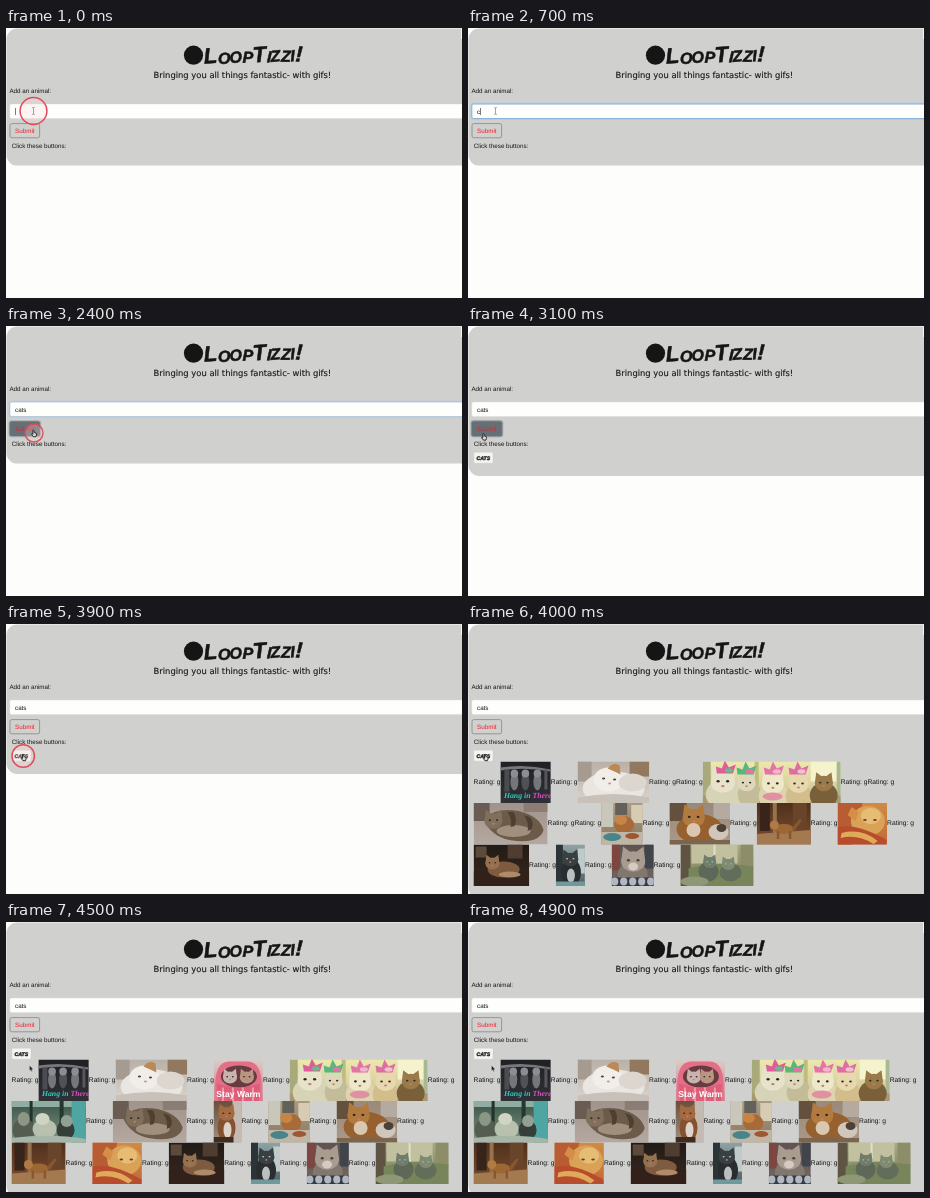
An HTML page for the animation above (5100 ms loop, 456 by 270 pixels).

```html
<!DOCTYPE html>
<html lang="en">
<head>
<meta charset="utf-8">
<title>Animal search</title>
<style>
  html, body { margin: 0; width: 100%; height: 100%; overflow: hidden; background: #fdfdfb; }
  #stage { display: block; width: 456px; height: 270px; }
  text { font-family: "Liberation Sans", Arial, sans-serif; font-size: 6.25px; fill: #151515; white-space: pre; text-rendering: geometricPrecision; }
  .marker { font-weight: bold; font-style: italic; stroke: #151515; stroke-width: .5px; }
  .tag { font-family: "DejaVu Sans", Verdana, sans-serif; font-size: 8.38px; stroke: #151515; stroke-width: .12px; }
  .rate { font-size: 6.7px; }
</style>
</head>
<body>
<svg id="stage" viewBox="0 0 456 270" xmlns="http://www.w3.org/2000/svg">
  <rect width="456" height="270" fill="#fdfdfb"/>
  <rect id="panel" x=".4" y=".6" width="480" height="137" rx="11" fill="#d0d0ce"/>
  <rect x="455" y="1" width="1" height="10" fill="#f6f6f4"/>

  <circle cx="187.5" cy="27.2" r="9.6" fill="#151515"/>
  <g id="title" transform="rotate(-1.5 247 28)"></g>
  <text class="tag" x="147.6" y="49.6">Bringing you all things fantastic- with gifs!</text>

  <text x="3.4" y="65.2">Add an animal:</text>
  <rect id="glow" x="2.6" y="74.8" width="470" height="16.6" rx="3" fill="#a9c9ea"/>
  <rect x="3.8" y="76" width="470" height="14.6" rx="1.8" fill="#fefefd" stroke="#dcdcda" stroke-width=".4"/>
  <rect id="edge" x="3.8" y="76" width="470" height="14.6" rx="1.8" fill="none" stroke="#7fabd9" stroke-width=".9"/>
  <text id="typed" x="9" y="86"></text>
  <rect id="caret" x="9" y="80" width=".7" height="7" fill="#444"/>

  <rect id="halo" x="2.6" y="94.2" width="32.6" height="17" rx="3" fill="#6c757d" opacity="0"/>
  <rect x="4" y="95.6" width="29.6" height="14.2" rx="1.8" fill="none" stroke="#83888a" stroke-width=".8"/>
  <rect id="dark" x="3.8" y="95.4" width="30" height="14.6" rx="1.8" fill="#667074" opacity="0"/>
  <text id="submit" x="18.8" y="105" text-anchor="middle" style="fill:#ea1f2c">Submit</text>

  <text x="5.8" y="120.2">Click these buttons:</text>
  <g id="tagButton">
    <rect x="5.8" y="126.2" width="19.2" height="11" rx="1" fill="#f4f4f1" stroke="#c6c6c2" stroke-width=".4"/>
    <text class="marker" x="15.4" y="133.6" text-anchor="middle" style="font-size:5.2px;stroke-width:.35px">CATS</text>
  </g>
  <g id="gallery"></g>

  <circle id="ring" fill="#ffdcdc" fill-opacity=".28" stroke="#df4c59" stroke-width="1.5"/>
  <g id="pointer">
    <path id="beam" d="M-1.3-3.5Q0-3.5 0-2.6Q0-3.5 1.3-3.5M0-2.6V2.6M-1.3 3.5Q0 3.5 0 2.6Q0 3.5 1.3 3.5" fill="none" stroke="#666" stroke-width=".6"/>
    <path id="hand" d="M-1.2-3.2Q-.5-3.7 0-3L.3-1 2.2-.4Q2.7 0 2.4 1.4L1.9 3.1H-.7L-2.3.8Q-2.4 0-1.7.1L-1 .7Z" fill="#ddd" stroke="#1c1c1c" stroke-width=".9"/>
    <path id="arrow" d="M-1.6-3.2V2.6L-.3 1.5.6 3.4 1.5 3 .7 1.1 2.5 1Z" fill="#222" stroke="#eee" stroke-width=".4"/>
  </g>
</svg>
<script>
const $ = id => document.getElementById(id);
const LOOP = 5100, STEP = 100;

// Tables hold [time, ...values]; the latest row that has begun is in force.
const at = (rows, t) => rows.filter(r => r[0] <= t).pop().slice(1);

const POINTER = [
  [0, 'beam', 27.5, 83], [1000, '', 0, 0],
  [1800, 'beam', 19.5, 87], [1900, 'beam', 18.5, 91],
  [2000, 'hand', 19, 97], [2100, 'hand', 22, 101], [2200, 'hand', 26, 105], [2300, 'hand', 28, 107.6],
  [2900, 'hand', 28, 108], [3100, 'hand', 16, 111],
  [3200, 'arrow', 15, 115], [3300, 'arrow', 15, 121],
  [3400, 'hand', 16, 127], [3500, 'hand', 17, 131], [3600, 'hand', 17.6, 133.6],
  [4500, 'arrow', 25, 146.4]
];
const RING = [
  [0, 27.5, 83, 13.4, 1], [100, 27.5, 83, 14, .6], [200, 27.5, 83, 14.4, .25], [300, 0, 0, 0, 0],
  [2400, 28, 107, 9, .9], [2500, 28, 107, 11.5, 1], [2600, 28, 107, 13, .5], [2700, 0, 0, 0, 0],
  [3700, 17.2, 132, 7, .8], [3800, 17.2, 132, 9.5, 1], [3900, 17.2, 132, 11.2, 1], [4000, 0, 0, 0, 0]
];
const FOCUS = [[0, 0], [100, .4], [200, .8], [300, 1], [2400, .5], [2500, 0]];
const HOVER = [[0, 0], [2000, .4], [2100, .8], [2200, 1], [3200, .5], [3300, 0]];
const HALO = [[0, 0], [2400, .4], [2500, .6], [3500, .3], [3600, 0]];
const TYPED = [[0, ''], [700, 'c'], [800, 'ca'], [1100, 'cat'], [1300, 'cats']];
const CARET = [[0, 1], [500, 0], [700, 1], [1800, 0]];
const PANEL = [[0, 137], [2500, 149.4], [4000, 273.9]];
const PHASE = [[0, -1], [4000, 0], [4100, 1], [4500, 2], [4900, 3]];

// Shape helpers
const box = (x, y, w, h, c) => `<rect x="${x}" y="${y}" width="${w}" height="${h}" fill="${c}"/>`;
const oval = (x, y, rx, ry, c) => `<ellipse cx="${x}" cy="${y}" rx="${rx}" ry="${ry}" fill="${c}"/>`;
const path = (d, c) => `<path d="${d}" fill="${c}"/>`;
const head = (x, y, r, c, eye = '#2b2723') =>
  path(`M${x - r} ${y}l${r * .15} ${-r * 1.25} ${r * .6} ${r * .45}h${r * .5}l${r * .6} ${-r * .45} ${r * .15} ${r * 1.25}z`, c) +
  oval(x, y, r, r * .85, c) +
  oval(x - r * .4, y - r * .1, r * .13, r * .1, eye) +
  oval(x + r * .4, y - r * .1, r * .13, r * .1, eye) +
  oval(x, y + r * .3, r * .14, r * .1, '#b98078');
const hat = (x, y, c, c2) =>
  path(`M${x - 9} ${y}l-1-7 6 2 3-8 4 7 7-3-3 9z`, c) + oval(x + 3, y - 3, 4, 2.2, c2);

// Each photo: width, top tone, bottom tone, shapes for a sway s.
const PHOTOS = [
  [50.4, '#1f2023', '#303136', s =>
    path('M0 6Q25 2 50 8V10Q25 5 0 9Z', '#77787d') + box(4, 8, 5, 22, '#4b4c51') + box(44, 8, 3, 20, '#56575c') +
    [14, 25, 37].map((x, i) => oval(x + s, 20, 4, 9, i % 2 ? '#505156' : '#75767b') + oval(x + s, 12, 3.8, 4, '#8c8d92')).join('') +
    '<text x="3.5" y="36.6" style="font:italic bold 7.8px \'Liberation Serif\',serif;fill:#35c9bb">Hang in <tspan fill="#d94fc0">There</tspan></text>'],
  [71.5, '#b9b0a6', '#d9d4ce', s =>
    box(52, 0, 20, 15, '#92785e') + box(0, 0, 14, 20, '#a69b90') +
    oval(36, 27, 31, 17, '#e9e5e0') + oval(30 + s, 18, 15, 12, '#f1eeea') + oval(55, 21, 14, 9, '#dcd6cf') +
    path(`M${29 + s} 7q6-7 12-3l1 9q-6-3-13-6z`, '#bb8858') + oval(25 + s, 17, 1.6, .9, '#4d443c') + oval(36 + s, 18, 1.6, .9, '#4d443c') +
    oval(31 + s, 22, 1.5, 1, '#c99690') + path('M0 36Q36 29 72 36V42H0Z', '#c8c1ba')],
  [49, '#d9cdc6', '#d8788c', s =>
    path('M2 38Q-2 3 15 2H34Q51 3 47 38Z', '#e26f87') + oval(25, 17, 18, 11, '#683b40') +
    head(17 + s, 18, 7, '#c8b4ac') + head(32 - s, 18, 7, '#b99582') +
    path('M3 24Q25 32 46 24L45 42H4Z', '#df5d78') +
    [8, 18, 28, 38].map(x => box(x, 28, 2, 14, '#eb9dac')).join('') +
    '<text x="24.5" y="37" text-anchor="middle" style="font-weight:bold;font-size:8.6px;fill:#fff">Stay Warm</text>'],
  [138, '#ece8ae', '#cbbf96', s =>
    box(0, 0, 8, 42, '#a9aa7c') + box(52, 0, 4, 26, '#bfbd7e') + box(108, 0, 26, 20, '#f5f3cd') +
    box(134, 0, 4, 42, '#a8b893') + box(0, 34, 138, 8, '#a99772') +
    oval(24, 33, 21, 16, '#d6d3b6') + head(20 + s, 21, 12, '#e6e3ca') + oval(47, 33, 12, 13, '#c3bc98') + head(44 - s, 22, 9, '#ddd8ba') +
    oval(71, 35, 15, 14, '#ddd3af') + head(70 + s, 23, 11, '#eee7c8') + oval(70, 35, 10, 4, '#df91a2') +
    oval(96, 35, 13, 13, '#d3bd8c') + head(96 - s, 23, 10, '#e8d8ae') +
    oval(121, 34, 14, 13, '#79603b') + head(121 + s, 22, 9, '#9b7a4a') +
    hat(23 + s, 12, '#df5d9a', '#5fbf88') + hat(44 - s, 13, '#57b77d', '#e573a8') +
    hat(71 + s, 13, '#e474a8', '#f0b6cc') + hat(96 - s, 13, '#df6ca2', '#efc0d0')],
  [74.3, '#3a5446', '#829589', s =>
    box(0, 0, 74, 6, '#8fada0') + box(60, 0, 14, 42, '#4fa5a2') + box(18, 0, 3, 30, '#21342c') + box(48, 0, 4, 34, '#24382f') +
    oval(12, 29, 11, 12, '#545d50') + oval(11 + s, 18, 6, 7, '#8b9684') +
    oval(33, 28, 12, 10, '#b8c0ae') + oval(32 - s, 18, 7, 6, '#d0d5c3') +
    oval(54, 29, 9, 10, '#343f39') + oval(54 + s, 20, 6, 6, '#92a093') + path('M0 37Q40 32 74 38V42H0Z', '#a6b6a9')],
  [74, '#a0938b', '#b5a8a1', s =>
    box(0, 0, 16, 18, '#6a5c53') + box(50, 0, 24, 9, '#8b7d73') +
    path('M10 16Q22 4 45 8Q66 13 70 27Q66 40 43 38Q18 36 10 16Z', '#6c5b49') +
    oval(40, 28, 17, 6, '#a08f7c') + head(21 + s, 18, 9, '#80705b') +
    path('M34 9q5 8 3 15l4-1q3-8-1-14z', '#4d4033') + path('M50 12q6 8 4 16l4-2q3-7-2-12z', '#4d4033')],
  [28, '#6b4e3b', '#a09082', s =>
    box(19, 0, 9, 42, '#c3bab1') + oval(13, 27, 9, 14, '#85512f') + head(13 + s, 13, 8, '#a46b40') +
    oval(14, 29, 4, 8, '#dfd4c9') + box(0, 36, 20, 6, '#3e2c22')],
  [41.5, '#a99b84', '#8b7861', s =>
    box(0, 0, 12, 24, '#c9c7ba') + box(14, 0, 12, 12, '#63615a') + box(30, 2, 12, 18, '#d7cbb3') +
    oval(23, 22, 10, 9, '#a66b38') + oval(19 + s, 17, 6, 5, '#c78445') + box(0, 29, 42, 13, '#bfb6a6') +
    oval(11, 34, 9, 4, '#47858a') + oval(31, 33, 7, 3, '#a0572f')],
  [60.5, '#99897a', '#aa9987', s =>
    box(0, 0, 17, 18, '#65503d') + box(44, 0, 17, 16, '#b5aaa0') + oval(30, 26, 23, 15, '#96602f') +
    head(23 + s, 15, 11, '#b37a40') + oval(24, 27, 7, 7, '#d9c7b0') + oval(49, 29, 10, 8, '#d0c6bb') +
    oval(52, 25, 5, 4, '#4d4037') + box(0, 37, 61, 5, '#7c654f')],
  [54, '#50301c', '#7a5030', s =>
    box(3, 0, 10, 28, '#38241a') + box(16, 0, 4, 30, '#95734e') + box(36, 0, 14, 24, '#68452a') +
    path('M0 31L54 27V42H0Z', '#a3794f') + oval(27, 26, 10, 5, '#9d6735') + oval(17 + s, 22, 4.5, 4.5, '#b27a43') +
    box(20, 28, 2.5, 8, '#8a572c') + box(32, 28, 2.5, 8, '#8a572c') + path('M35 25l8-9 2 1-7 11z', '#8a572c')],
  [49.5, '#cf8b45', '#c2693a', s =>
    path('M0 0H25L14 42H0Z', '#b85d33') + oval(31 + s, 18, 17, 15, '#daa257') + oval(34 + s, 13, 10, 8, '#e7bd76') +
    path('M0 24Q20 20 49 37V42H0Z', '#b74d2d') + path('M4 30Q24 25 40 38L36 41Q20 31 3 35Z', '#dfaa59') +
    path('M14 4l7 5-3 9-8-6z', '#d58e48') + oval(28 + s, 17, 1.8, 1, '#6a3d22') + oval(38 + s, 17, 1.8, 1, '#6a3d22')],
  [55.5, '#211a16', '#392a20', s =>
    box(34, 0, 15, 14, '#4e3d30') + box(2, 2, 11, 11, '#5c4a3b') + path('M0 27Q28 21 56 27V42H0Z', '#31211a') +
    oval(30, 25, 16, 8, '#7e5b3e') + head(20 + s, 19, 7, '#967150') + oval(36, 30, 11, 3, '#ae8c6b')],
  [29, '#8fa3a5', '#4e6063', s =>
    box(0, 0, 7, 42, '#2b3436') + box(22, 4, 7, 25, '#bfcbcb') + oval(15, 28, 10, 14, '#292d2f') +
    head(15 + s, 15, 8, '#3a4042', '#b7ccb4') + oval(15, 31, 4, 7, '#b9c1be') + box(0, 37, 29, 5, '#6f999d')],
  [42, '#5f5350', '#716863', s =>
    box(0, 0, 8, 26, '#7d4640') + box(33, 0, 9, 24, '#40454b') + oval(21, 30, 15, 12, '#81776f') +
    head(21 + s, 17, 12, '#a99b90', '#3d4a2b') + oval(21 + s, 22, 5, 4, '#d6cbc3') + box(0, 33, 42, 9, '#343a43') +
    [0, 1, 2, 3, 4].map(i => oval(3 + i * 9, 37, 3.6, 4, '#b1b8c2')).join('')],
  [73, '#a8ab85', '#717b58', s =>
    box(0, 0, 10, 42, '#5f5443') + box(11, 0, 46, 19, '#c1c1a0') + box(33, 0, 2, 22, '#e0dfce') + box(60, 0, 13, 24, '#8d8d6a') +
    path('M8 24Q36 16 73 22V42H8Z', '#78845a') + oval(28, 27, 10, 10, '#5d6859') + head(28 + s, 18, 6.5, '#707d6c', '#79e0d0') +
    oval(50, 28, 11, 9, '#626e59') + head(49 - s, 20, 6.5, '#7e8a72', '#79e0d0') + oval(14, 37, 14, 5, '#8f9876')]
];
const ROW = 41.5, RATE = 26.8, LEFT = 5.6, RIGHT = 452;
const LATE = [2, 4, 6];   // photos that load one step later

function gallery(phase) {
  if (phase < 0) return '';
  let x = LEFT, y = 137.5, out = '';
  const place = w => {
    if (x + w > RIGHT) { x = LEFT; y += ROW; }
    x += w;
    return x - w;
  };
  const rate = () => { out += `<text class="rate" x="${place(RATE)}" y="${y + 22.3}">Rating: g</text>`; };
  rate();
  PHOTOS.forEach(([w, top, low, draw], i) => {
    if (phase || !LATE.includes(i)) {
      const px = place(w), sway = Math.sin(phase * 1.7 + i) * 1.2;
      out += `<svg x="${px}" y="${y}" width="${w}" height="${ROW}" overflow="hidden">
        <linearGradient id="tone${i}" x2="0" y2="1"><stop stop-color="${top}"/><stop offset="1" stop-color="${low}"/></linearGradient>
        ${box(0, 0, w, ROW, `url(#tone${i})`)}${draw(sway)}</svg>`;
    }
    if (i < PHOTOS.length - 1) rate();
  });
  return out;
}

const set = (id, attrs) => { for (const k in attrs) $(id).setAttribute(k, attrs[k]); };

$('title').innerHTML = '<text class="marker" x="198" y="34.6">' + [...'LoopTizzi!'].map((ch, i) => {
  const size = /[A-Z!]/.test(ch) ? 22 : 16;
  return `<tspan rotate="${[-3, 4, -4, 2][i % 4]}" style="font-size:${size}px">${ch.toUpperCase()}</tspan>`;
}).join('') + '</text>';

let shown = -1;
function render(time) {
  const t = Math.floor(time % LOOP / STEP) * STEP;
  const [kind, px, py] = at(POINTER, t);
  const [cx, cy, r, opacity] = at(RING, t);
  const [focus] = at(FOCUS, t), [hover] = at(HOVER, t), [phase] = at(PHASE, t);

  set('panel', { height: at(PANEL, t)[0] });
  set('glow', { opacity: focus });
  set('edge', { opacity: focus });
  set('dark', { opacity: hover });
  set('halo', { opacity: at(HALO, t)[0] });
  $('submit').style.fill = hover > .7 ? '#c9303c' : '#ea1f2c';

  $('typed').textContent = at(TYPED, t)[0];
  set('caret', { x: 9.1 + $('typed').getComputedTextLength(), opacity: at(CARET, t)[0] });
  set('tagButton', { opacity: t >= 2500 ? 1 : 0 });

  set('ring', { cx, cy, r, opacity });
  set('pointer', { transform: `translate(${px} ${py})` });
  for (const id of ['beam', 'hand', 'arrow']) set(id, { opacity: id === kind ? 1 : 0 });

  if (phase !== shown) {
    $('gallery').innerHTML = gallery(phase);
    shown = phase;
  }
}

const start = performance.now();
function tick() {
  render(performance.now() - start);
  requestAnimationFrame(tick);
}
tick();
</script>
</body>
</html>
```
